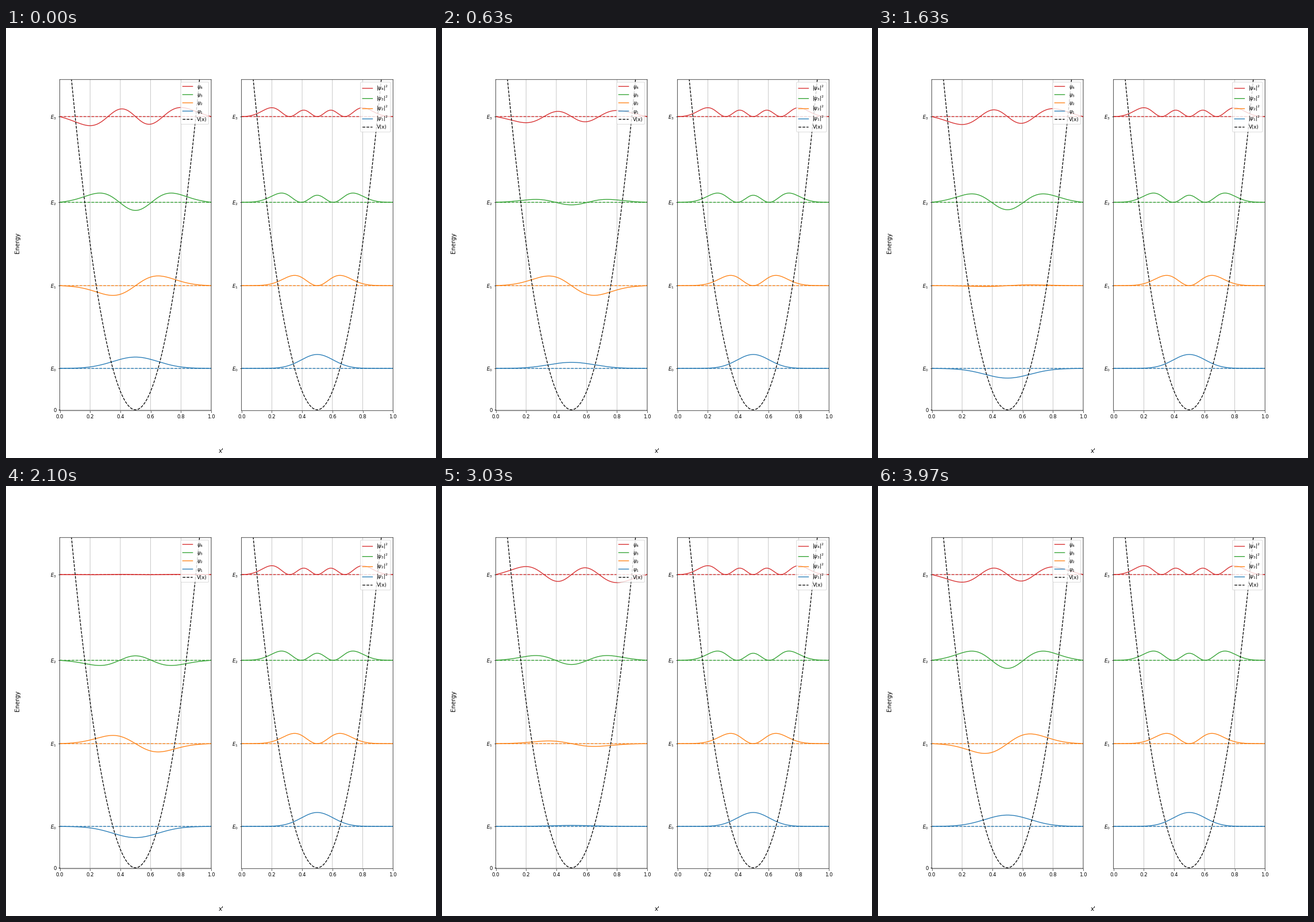
A matplotlib script for the animation above (4010 ms loop, 748 by 748 pixels).

```python
import numpy as np
import matplotlib.pyplot as plt
from matplotlib.animation import FuncAnimation

SIZE, INCHES = 748, 12
STEPS, LOOP_MS = 120, 4010
FRAMES = 2 * STEPS  # half-step frames, each shows the nearest step
N, STATES = 1000, 4


def potential(x):
    return 1000 * (x - 0.5) ** 2


def solve(x):
    """Lowest states of -1/2 psi'' + V psi = E psi with psi = 0 at both walls."""
    dx = x[1] - x[0]
    inner = x[1:-1]
    off = np.full(len(inner) - 1, -0.5 / dx**2)
    h = np.diag(1 / dx**2 + potential(inner)) + np.diag(off, 1) + np.diag(off, -1)
    energy, vec = np.linalg.eigh(h)
    psi = np.zeros((STATES, len(x)))
    psi[:, 1:-1] = vec[:, :STATES].T
    # make the rightmost lobe of every state positive
    psi *= np.sign(psi[:, int(0.85 * N)])[:, None]
    return energy[:STATES], psi


x = np.linspace(0, 1, N + 1)
energy, psi = solve(x)
wave, density = 100 * psi, 2000 * psi**2
times = np.linspace(0, 2 * np.pi / energy[0], STEPS)

plt.rcParams.update({"font.family": "DejaVu Sans", "path.snap": False})
fig, (left, right) = plt.subplots(1, 2, figsize=(INCHES, INCHES), dpi=SIZE / INCHES)


def draw_panel(ax, curves, label):
    lines = {}
    for n in reversed(range(STATES)):
        color = f"C{n}"
        ax.axhline(energy[n], color=color, ls="--")
        lines[n], = ax.plot(x, energy[n] + curves[n], color=color,
                            label=label.format(n + 1))
    ax.plot(x, potential(x), "k--", label="V(x)")
    ax.set_xlim(0, 1)
    ax.set_ylim(-0.5, energy[-1] + 20)
    ax.grid(True)
    ax.legend(loc="upper right", labelspacing=0.385)
    return lines


level_names = [f"$E_{n}$" for n in range(STATES)]
waves = draw_panel(left, wave, r"$\psi_{}$")
draw_panel(right, density, r"$|\psi_{}|^2$")
left.set_yticks([0, *energy], ["0", *level_names])
right.set_yticks(energy, level_names)
fig.supxlabel("x'")
fig.supylabel("Energy")


def update(frame):
    t = times[min((frame + 1) // 2, STEPS - 1)]
    for n, line in waves.items():
        line.set_ydata(energy[n] + wave[n] * np.cos(energy[n] * t))
    return list(waves.values())


anim = FuncAnimation(fig, update, frames=FRAMES, interval=LOOP_MS / FRAMES,
                     repeat=True, repeat_delay=0, blit=False)
plt.show()
```
